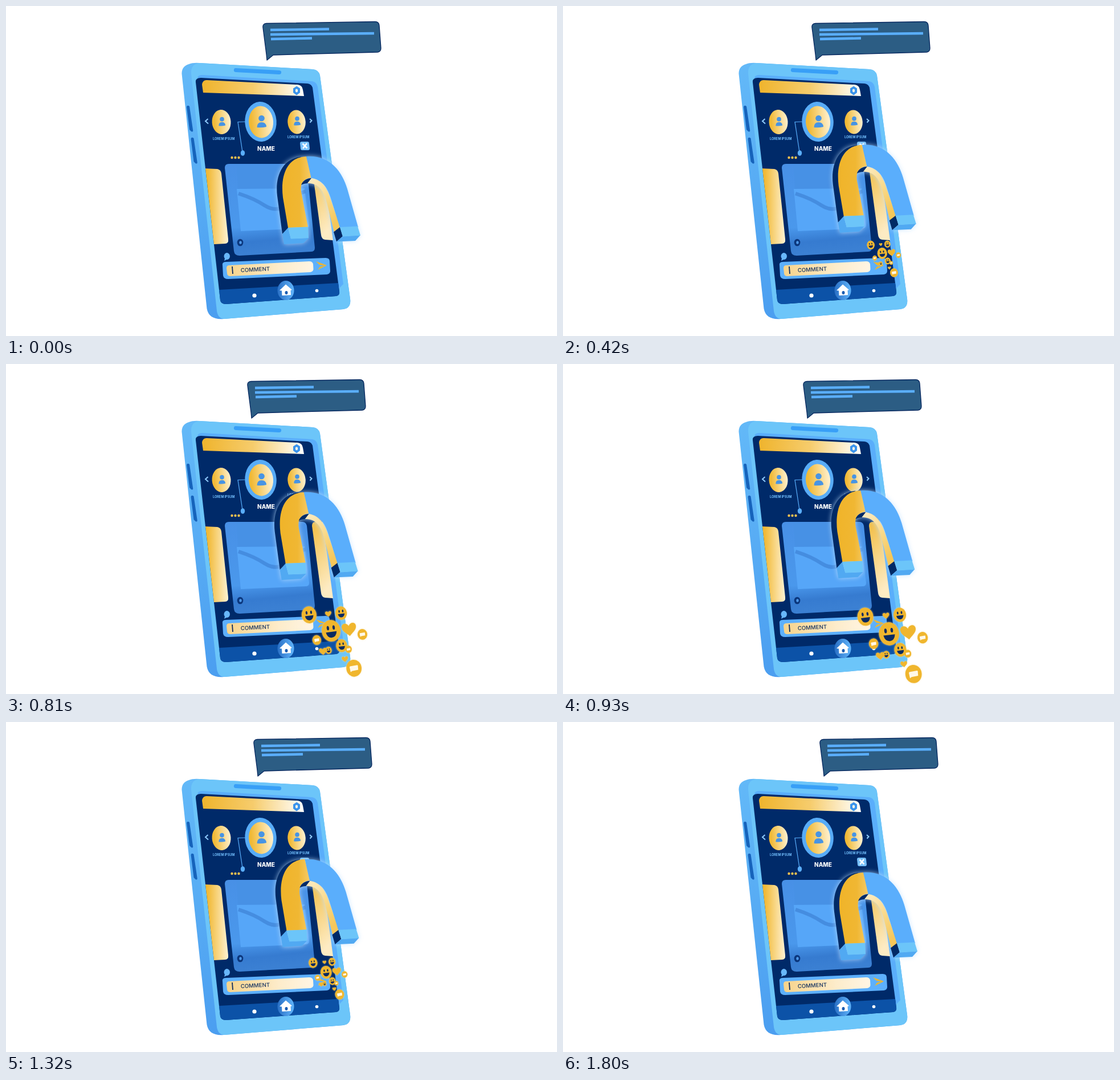
These frames come from a looping animation (967x579 px, 1.83 s). An HTML page:

```html
<!DOCTYPE html>
<html lang="en">
<head>
<meta charset="utf-8">
<title>Phone and magnet</title>
<style>
html, body { margin: 0; width: 100%; height: 100%; overflow: hidden; background: #fff }
svg { display: block; width: 100vw; height: 100vh }
text { font-family: Inter, Roboto, sans-serif }
.glow { filter: drop-shadow(0 0 4px #bfe0ffd0) }
.halo { filter: drop-shadow(0 0 1.5px #f8dc93c0) }
</style>
</head>
<body>
<svg viewBox="0 0 967 579">
<defs>
  <linearGradient id="gold"><stop offset=".1" stop-color="#f1b935"/><stop offset=".6" stop-color="#f9d98c"/><stop offset="1" stop-color="#fff1d2"/></linearGradient>
  <linearGradient id="bar"><stop offset="0" stop-color="#efb42d"/><stop offset=".5" stop-color="#f6cc6c"/><stop offset=".85" stop-color="#fdf0d3"/><stop offset="1" stop-color="#fff"/></linearGradient>
  <linearGradient id="input"><stop offset="0" stop-color="#f7d38a"/><stop offset=".6" stop-color="#fdecca"/><stop offset="1" stop-color="#fff5e4"/></linearGradient>
  <linearGradient id="fall" x2=".3" y2="1"><stop offset="0" stop-color="#f2bd42"/><stop offset="1" stop-color="#fdebc3"/></linearGradient>
  <linearGradient id="arm" x2=".5" y2="1"><stop offset="0" stop-color="#fdecc4"/><stop offset=".55" stop-color="#f9d989"/><stop offset="1" stop-color="#f5c75a"/></linearGradient>
  <linearGradient id="leg"><stop offset="0" stop-color="#f0b429"/><stop offset=".6" stop-color="#f0b733"/><stop offset="1" stop-color="#f6cb67"/></linearGradient>
  <linearGradient id="side" x2=".2" y2="1"><stop offset="0" stop-color="#63b9f8"/><stop offset="1" stop-color="#4b9ef0"/></linearGradient>
  <linearGradient id="card" x2=".1" y2="1"><stop offset="0" stop-color="#4890e6"/><stop offset=".7" stop-color="#4a98ec"/><stop offset=".87" stop-color="#367bd0"/><stop offset="1" stop-color="#3b80d3"/></linearGradient>
  <linearGradient id="home"><stop offset="0" stop-color="#2a70c5"/><stop offset="1" stop-color="#60b4fb"/></linearGradient>
  <g id="person" fill="#4794e4"><circle cy="-6" r="5.300"/><path d="M-8 10Q-8 1 0 1Q8 1 8.500 9Q1 11 -8 10Z"/></g>
  <g id="smile">
    <ellipse rx=".87" ry="1" fill="#f0b62e"/>
    <g fill="#0a2a60"><ellipse cx="-.27" cy="-.28" rx=".11" ry=".2"/><ellipse cx=".27" cy="-.28" rx=".11" ry=".2"/><path d="M-.5 .1L.5 .1Q.42 .62 0 .64Q-.42 .62 -.5 .1Z"/></g>
  </g>
  <path id="heart" fill="#f0b62e" d="M0 .95C-.35 .55 -1 .2 -1 -.35C-1 -.95 -.25 -1 0 -.45C.25 -1 1 -.95 1 -.35C1 .2 .35 .55 0 .95Z"/>
  <g id="note">
    <ellipse rx=".9" ry="1" fill="#f0b62e"/>
    <path fill="#fff8e8" d="M-.44 -.27L.42 -.32Q.5 -.32 .5 -.23L.48 .25L-.26 .31L-.44 .42L-.5 -.18Z"/>
  </g>
</defs>

<!-- phone body -->
<path fill="url(#side)" d="M308.500 119Q308 106 321 102Q328 99 340 100L538 111Q549 112 551 122L604 514Q606 530 592 532L382 549Q356 551 352.500 531Z"/>
<path fill="#6cc5f9" d="M325 119Q324 101 340 100L538 111Q549 112 551 122L604 514Q606 530 592 532L384 549Q372 549 370 535Z"/>
<path fill="#389ff7" d="M403 109L480 113Q484 114 483 117Q483 120 479 120L403 116Q399 115 400 112Q400 109 403 109Z"/>
<path id="key" fill="#1663bb" d="M317 177Q318 173 322 176L328 217Q329 222 325 220L322 217Z"/>
<use href="#key" x="7.5" y="56"/>
<path fill="#5aaefb" d="M336 126Q337 121 345 121L537 132Q545 133 547 142L592 488L580 500Z"/>
<path fill="#002a69" d="M333 134Q332 126 342 126L529 136Q536 137 538 143L585 501Q586 508 579 509L386 523Q377 523 376 516Z"/>
<path fill="#0c52a7" d="M374 498L583 486L585 501Q586 508 579 509L386 523Q377 523 376 516Z"/>

<!-- header -->
<path fill="url(#bar)" d="M344 138Q345 130 352 130L512 138Q520 139 521 147L523 158L346 152Z"/>
<path fill="none" stroke="#3b94ec" stroke-width="4" d="M510 143L514 145.5L514 151L510 154L506 151L506 145.5Z"/>
<path fill="none" stroke="#8fcbff" stroke-width="2" d="M354.500 198L350 202L355 206.500M533 198L536.500 201L533.500 204.500"/>
<path fill="none" stroke="#5aaefa" stroke-width="1.200" d="M420 203L407 203.500L415 256"/>
<ellipse cx="415.500" cy="258" rx="3.700" ry="4.800" fill="#5aaefa"/>
<g fill="#f3c150"><circle cx="396.500" cy="266" r="2.200"/><circle cx="402.500" cy="266" r="2.200"/><circle cx="408.500" cy="266" r="2.200"/></g>
<ellipse cx="447" cy="203" rx="27.700" ry="35" fill="#58acf7" transform="rotate(-4 447 203)"/>
<g fill="url(#gold)">
  <ellipse cx="447.500" cy="203.500" rx="21.500" ry="28" transform="rotate(-4 447 203)"/>
  <ellipse cx="378" cy="203.500" rx="16.500" ry="21.500" transform="rotate(-4 378 203)"/>
  <ellipse cx="510" cy="203.500" rx="15.700" ry="21" transform="rotate(-4 510 203)"/>
</g>
<use href="#person" transform="translate(448.500 203)"/>
<use href="#person" transform="translate(379 203) scale(.72)"/>
<use href="#person" transform="translate(511 202) scale(.72)"/>
<g font-size="5.500" font-weight="700" fill="#74c1ff"><text x="363" y="234.500">LOREM IPSUM</text><text x="494" y="231.500">LOREM IPSUM</text></g>
<text x="441" y="254" font-size="10" font-weight="800" fill="#fff">NAME</text>
<path fill="#76bffa" d="M519 238L529 238Q532 238 532 241L533 250Q533 253 530 253L520 253Q517 253 517 250L516 241Q516 238 519 238Z"/>
<path stroke="#fff" stroke-width="2.500" d="M520.500 241.500L528.500 249.500M528 241L521 250"/>

<!-- feed -->
<path fill="url(#gold)" d="M350 285L371 286Q377 287 378 294L390 409Q391 417 384 417L365 418Z"/>
<path fill="url(#fall)" d="M537 284Q537 277 543 277L556 277L574 411L560 410Q554 409 553 402Z"/>
<path fill="url(#card)" d="M384 284Q384 277 391 277L521 277Q527 278 528 284L542 424Q542 431 536 431L410 438Q401 438 400 430Z"/>
<path fill="#4791e5" d="M405 278L490 278L494 321L407 321Z"/>
<path fill="#56a6f8" d="M405 321L524 320L532 384Q532 390 526 390L412 395Z"/>
<path fill="none" stroke="#458de0" stroke-width="6.500" d="M408 329Q436 338 454 350Q470 360 484 354Q505 331 526 325"/>
<ellipse cx="411" cy="415" rx="5.300" ry="6.300" fill="#0b367c"/><ellipse cx="411.500" cy="415" rx="2.200" ry="2.700" fill="#4d98e8"/>

<!-- comment row and navigation -->
<path fill="#68b7fb" d="M388 433A5.500 6 0 1 1 387 445L383 447L384 443A5.500 6 0 0 1 388 433Z"/>
<path fill="#5db0fc" d="M380 455Q379 449 386 449L561 442Q568 442 568 448L569 465Q569 470 563 471L390 479Q382 479 381 473Z"/>
<path fill="url(#input)" d="M387 460Q387 455 392 455L532 448Q538 448 539 453L539.500 462Q539 466 534 467L394 474Q388 474 388 469Z"/>
<path stroke="#0a2a60" stroke-width="1.800" d="M397 457L398 470"/>
<text transform="translate(412 467) rotate(-3)" font-size="9.600" font-weight="500" fill="#12305f">COMMENT</text>
<path fill="#f0b62e" d="M544 448L563 455L547 463L551 457.500L559 455.500L550 454Z"/>
<g fill="#fff"><circle cx="436" cy="508" r="3.600"/><circle cx="545.500" cy="499.500" r="2.800"/></g>
<ellipse cx="491" cy="499" rx="14.500" ry="17" fill="url(#home)"/>
<path fill="#fff" d="M480 499L491 488.500L502 498L499.500 499L500 507L484.500 508L484 499.500Z"/>
<ellipse cx="492" cy="503" rx="2.500" ry="3" fill="#1a5db2"/>

<g id="magnet" class="glow">
  <path fill="#002a66" d="M485 400L476 333C472 300 484 268 518 264.500L500 300L495 390Z"/>
  <path fill="url(#leg)" d="M495 389L486 336C481 296 494 265 527 264L536 301C522 303 516 311 518 326L530 388Z"/>
  <path fill="#002a66" d="M518 314C521 306 528 302 537 302L532 311Q523 311 518 314Z"/>
  <path fill="url(#arm)" d="M529 311L536 302C556 305 566 325 570 340L587 389L576 397L563 345C558 324 548 310 529 311Z"/>
  <path fill="#5aaefc" d="M527 264C569 261 590 291 599 321L618 388L586 389L570 337C564 317 554 305 535.500 301.500Z"/>
  <path fill="#51a9f2" d="M485 400L495 389L500 408L531 407L522 416L488 418Z"/>
  <path fill="#6cc5f9" d="M495 389L530 387.500L531 407L500 408.500Z"/>
  <path fill="#002a66" d="M575 396.500L586 388L591 404L580 413.500Z"/>
  <path fill="#51a9f2" d="M591 404L622 402L613 412L580 413.500Z"/>
  <path fill="#6cc5f9" d="M586 388L617 386.500L622 402.500L591 404.500Z"/>
</g>
<g id="burst" class="halo"></g>
<g id="bubble">
  <path fill="#2c5d84" stroke="#06275f" stroke-width="1.300" stroke-linejoin="round" d="M451 38Q450 31 457 30.500L648 27.500Q654 27.500 655 34L658 74Q658 80.500 652 81L469 86L458 95L457 85Z"/>
  <path stroke="#5aaefc" stroke-width="4.300" d="M464 42L567 40.500M464 50L646 48M465 58L537 56.500"/>
</g>
</svg>
<script>
const LOOP = 1830, HALF = 900, STEP = 30;
const CENTER = [549, 397];
const byId = id => document.getElementById(id);
const [magnet, burst, bubble] = ['magnet', 'burst', 'bubble'].map(byId);

// shape, x and y from the burst centre, half height
const reactions = [
  ['smile', -19, 48, 16.5], ['heart', 18.5, 46, 6], ['smile', 43.5, 44.5, 13],
  ['smile', 24, 79, 21], ['heart', 59, 76, 14], ['note', 85, 86, 10.5],
  ['note', -4, 97, 9.5], ['smile', 44.5, 108, 12.5], ['note', 58, 115, 7],
  ['heart', 8, 119, 7.5], ['smile', 19, 117, 7], ['heart', 51, 134, 6],
  ['note', 68.5, 152, 16.5]
];
burst.innerHTML = reactions.map(([shape, x, y, size]) =>
  `<use href="#${shape}" transform="translate(${x} ${y}) rotate(-7) scale(${size})"/>`).join('');

function draw() {
  const t = Math.floor(performance.now() % LOOP / STEP) * STEP;
  const p = 1 - Math.abs(t / HALF - 1);
  const move = (node, x, y, more = '') => node.setAttribute('transform', `translate(${x} ${y}) ${more}`);
  move(bubble, -30 * p, 0);
  move(magnet, -4.8 * p, -43.4 * p);
  move(burst, ...CENTER, `scale(${p})`);
  burst.style.display = p ? '' : 'none';
  requestAnimationFrame(draw);
}
draw();
</script>
</body>
</html>
```
